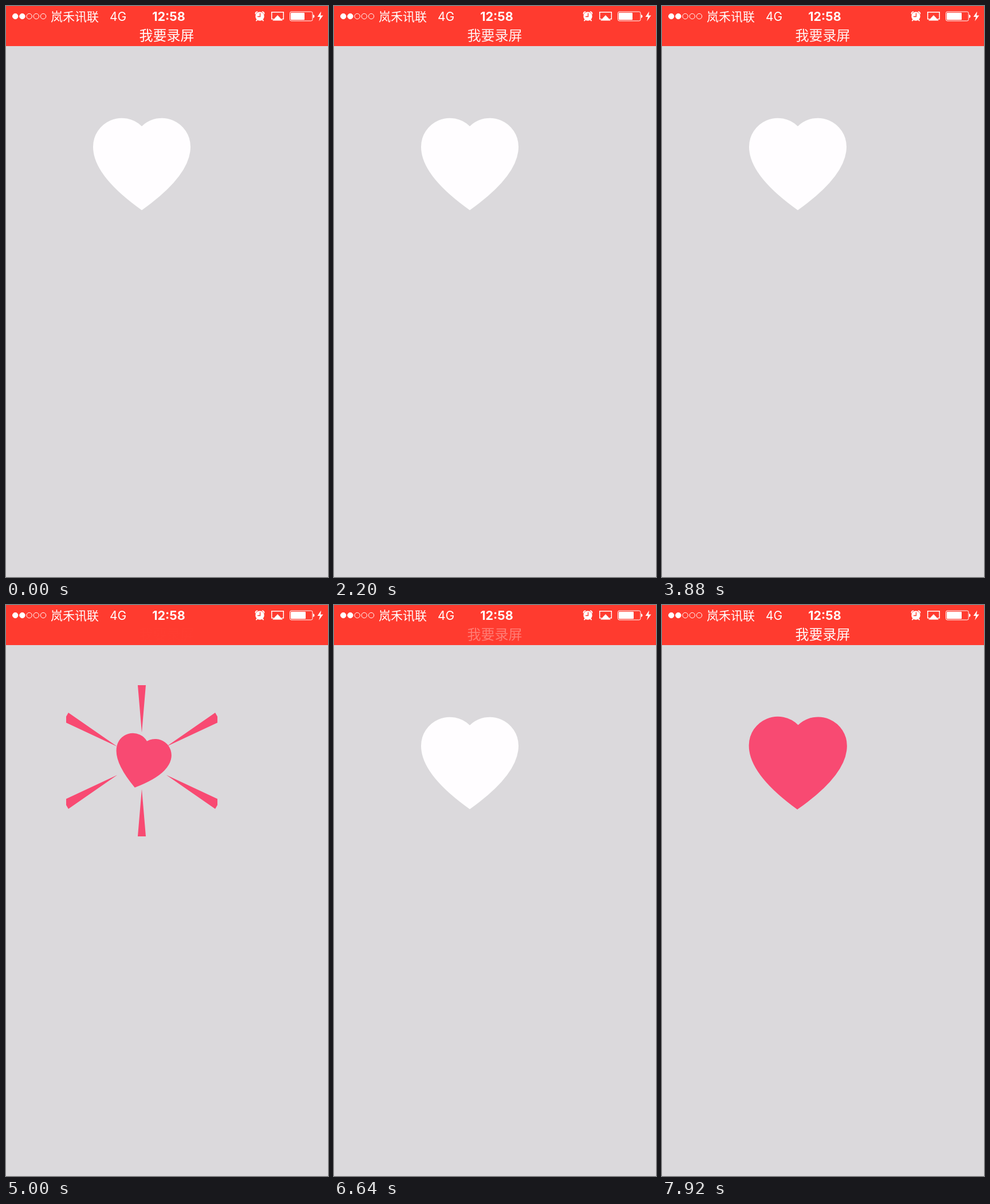
An HTML page for the animation above (7.96 s loop, 562 by 997 pixels).

```html
<!DOCTYPE html>
<html lang="zh-CN">
<head>
<meta charset="utf-8">
<title>Like button</title>
<style>
  html, body { margin: 0; width: 100%; height: 100%; overflow: hidden; background: #dbd9dc; }
  svg { display: block; width: 100vw; height: 100vh; }
  text { fill: #fff; font-family: Inter, "Noto Sans CJK SC", "Noto Sans CJK", sans-serif; }
</style>
</head>
<body>
<svg viewBox="0 0 562 997" preserveAspectRatio="none">
  <defs>
    <clipPath id="button"><rect x="-132" y="-132" width="264" height="264"/></clipPath>
    <path id="heart" d="M0-62A50 50 0 0 0-85-26Q-85 24 0 84.500Q85 24 85-26A50 50 0 0 0 0-62Z"/>
  </defs>
  <rect width="562" height="997" fill="#dbd9dc"/>
  <rect width="562" height="70" fill="#ff3b2f"/>

  <g id="signal" stroke="#fff"></g>
  <text x="78" y="26" font-size="21">岚禾讯联</text>
  <text x="181" y="26" font-size="21">4G</text>
  <text x="284" y="26" font-size="21.500" font-weight="700" text-anchor="middle">12:58</text>
  <text id="banner" x="280.500" y="60" font-size="24" text-anchor="middle">我要录屏</text>

  <g id="alarm" fill="none" stroke="#fff" stroke-width="1.800" stroke-linecap="round">
    <circle cx="443" cy="18" r="7.700" fill="#fff" stroke="none"/>
    <path d="M435.500 13.500Q435.500 10.500 438.500 10.200M450.500 13.500Q450.500 10.500 447.500 10.200M438 24.500L437 25.500M448 24.500L449 25.500"/>
    <path d="M443.500 13V18.500H439.500" stroke="#ff3b2f" stroke-width="1.400"/>
  </g>
  <g id="airplay">
    <path d="M467 22.800H463.700V10.700H484.300V22.800H481" fill="none" stroke="#fff" stroke-width="1.500"/>
    <path d="M474 16L483 25.500H465Z" fill="#fff"/>
  </g>
  <rect x="495.500" y="10" width="39.500" height="16" rx="2.500" fill="none" stroke="#fff"/>
  <rect id="charge" x="497" y="11.700" width="24" height="12.600" rx="1" fill="#fff"/>
  <path d="M536 15Q538.500 15.500 538.500 18T536 21Z" fill="#fff"/>
  <path d="M550 9.500L543.500 19H548L546 26.500L553.500 16.500H549Z" fill="#fff"/>

  <g transform="translate(237 272)">
    <use id="empty" href="#heart" fill="#fffdff"/>
    <path id="rays" fill="#f84a72" clip-path="url(#button)"/>
    <use id="full" href="#heart" fill="#f84a72"/>
  </g>
</svg>
<script>
const LOOP = 7960;
const LIKES = [402, 2366, 4765, 6968];
const LIKED_FOR = 1400;
const BURST = 500;
const SPRING_DELAY = 0.11, SPRING_END = 0.98, ROTATION_LAG = 0.023;
const RAY_LENGTH = 153, RAY_HALF_WIDTH = 8.8;
const CHARGE_TIME = 3600;

const el = id => document.getElementById(id);
const clamp = v => Math.min(1, Math.max(0, v));
const smooth = v => v * v * (3 - 2 * v);

el('signal').innerHTML = [0, 1, 2, 3, 4].map(i =>
  `<circle cx="${16.2 + i * 12.2}" cy="18" r="4.700" fill="${i < 2 ? '#fff' : 'none'}"/>`).join('');

// Displacement of a spring released at 1 (mass 1, stiffness 100, damping 5).
function spring(t) {
  if (t <= 0) return 1;
  const decay = 2.5, w = Math.sqrt(100 - decay * decay);
  return Math.exp(-decay * t) * (Math.cos(w * t) + decay / w * Math.sin(w * t));
}

// Rays grow out of the centre, then their tips run to the outer end.
function rayPath(age) {
  if (age <= 0 || age >= BURST) return '';
  const p = smooth(age / BURST);
  const scale = clamp(p / 0.2);
  const outer = RAY_LENGTH * scale;
  const half = RAY_HALF_WIDTH * scale;
  const inner = outer * clamp((p - 0.2) / 0.8);
  let d = '';
  for (let i = 0; i < 6; i++) {
    const a = i * Math.PI / 3, c = Math.cos(a), s = Math.sin(a);
    const at = (x, r) => `${(x * c + r * s).toFixed(2)} ${(x * s - r * c).toFixed(2)}`;
    d += `M${at(0, inner)}L${at(-half, outer)}L${at(half, outer)}Z`;
  }
  return d;
}

function heartTransform(age) {
  const t = age / 1000;
  if (t >= SPRING_END) return '';
  const scale = 1 - spring(t - SPRING_DELAY);
  const angle = 25 * spring(t - SPRING_DELAY - ROTATION_LAG);
  return `rotate(${angle.toFixed(3)}) scale(${scale.toFixed(4)})`;
}

function draw(ms) {
  const age = ms - LIKES.filter(t => t <= ms).pop();
  const liked = age < LIKED_FOR;
  const popping = liked && age > SPRING_DELAY * 1000;
  el('empty').style.display = liked ? 'none' : '';
  el('full').style.display = popping ? '' : 'none';
  if (popping) el('full').setAttribute('transform', heartTransform(age));
  el('rays').setAttribute('d', liked ? rayPath(age) : '');
  el('banner').setAttribute('opacity', (0.5 + 0.5 * Math.cos(Math.PI * (ms - 30) / 1000)).toFixed(3));
  el('charge').setAttribute('width', ms < CHARGE_TIME ? 24 : 26);
}

const start = performance.now();
function tick() {
  draw((performance.now() - start) % LOOP);
  requestAnimationFrame(tick);
}
draw(0);
requestAnimationFrame(tick);
</script>
</body>
</html>
```
